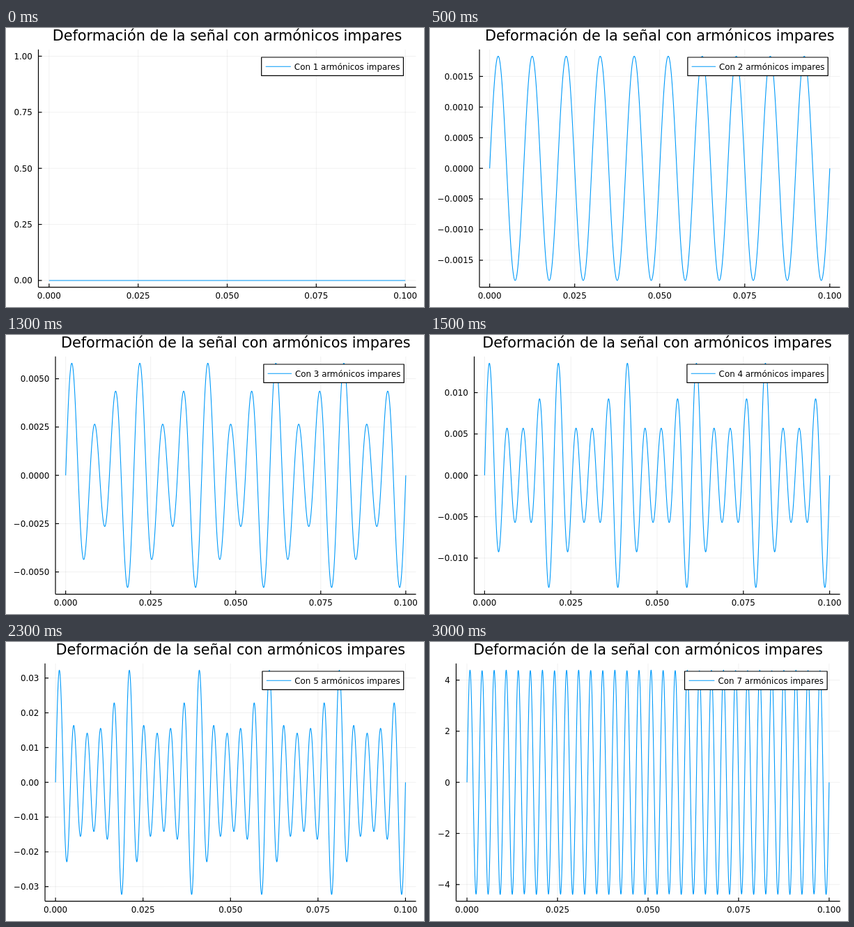
Write an HTML page with a canvas that moves like this. It is 600 by 400 pixels and loops after 3500 ms.

```html
<!DOCTYPE html>
<html lang="es">
<head>
<meta charset="utf-8">
<style>
html, body { margin: 0; width: 100%; height: 100%; overflow: hidden; background: #fff; }
canvas { display: block; }
</style>
</head>
<body>
<canvas id="plot" width="600" height="400"></canvas>
<script>
const ctx = document.getElementById('plot').getContext('2d');
const TOP = 30.8, BOTTOM = 371.6, RIGHT = 588.5, PAD = 0.03 / 1.06;
const HOLD = 500, DURATION = 0.1, SAMPLES = 2000, BLUE = '#009af9';

// Amplitude of each multiple of 50 Hz; the sixth one resonates.
const amplitudes = [0, 0.00183, 0.00418, 0.00824, 0.01964, 4.382, -0.023];

// Left axis position, tick step, highest tick (in steps) and decimals.
const views = [
  { left: 46.5, step: 0.25, count: 4, digits: 2 },
  { left: 71, step: 0.0005, count: 3, digits: 4 },
  { left: 71, step: 0.0025, count: 2, digits: 4 },
  { left: 63.5, step: 0.005, count: 2, digits: 3 },
  { left: 56, step: 0.01, count: 3, digits: 2 },
  { left: 37.5, step: 2, count: 2, digits: 0 },
  { left: 37.5, step: 2, count: 2, digits: 0 }
];

function signal(t, harmonics) {
  let sum = 0;
  for (let k = 0; k < harmonics; k++) {
    sum += amplitudes[k] * Math.sin(2 * Math.PI * 50 * (k + 1) * t);
  }
  return sum;
}

function line(x1, y1, x2, y2, color, width) {
  ctx.strokeStyle = color;
  ctx.lineWidth = width;
  ctx.beginPath();
  ctx.moveTo(x1, y1);
  ctx.lineTo(x2, y2);
  ctx.stroke();
}

function label(text, x, baseline, align, size = 11.9) {
  ctx.font = `${size}px "DejaVu Sans", sans-serif`;
  ctx.textAlign = align;
  ctx.fillStyle = '#000';
  ctx.fillText(text, x, baseline);
}

function drawLegend(harmonics, width) {
  const text = `Con ${harmonics} armónicos impares`;
  const right = RIGHT - width / 30, gap = width / 108;
  ctx.font = '11.9px "DejaVu Sans", sans-serif';
  const textX = right - gap - ctx.measureText(text).width;
  const lineEnd = textX - gap, lineStart = lineEnd - width / 15;
  const left = lineStart - width / 90;
  ctx.fillStyle = '#fff';
  ctx.fillRect(left, 42, right - left, 26.3);
  ctx.strokeStyle = '#000';
  ctx.lineWidth = 1.2;
  ctx.strokeRect(left, 42, right - left, 26.3);
  line(lineStart, 55.2, lineEnd, 55.2, BLUE, 1.1);
  label(text, textX, 59.6, 'left');
}

function draw(index) {
  const { left, step, count, digits } = views[index];
  const harmonics = index + 1, width = RIGHT - left, height = BOTTOM - TOP;
  const values = Array.from({ length: SAMPLES + 1 },
    (_, i) => signal(DURATION * i / SAMPLES, harmonics));
  const flat = index === 0;
  const max = flat ? 1 : Math.max(...values), min = flat ? 0 : -max;
  const toX = t => left + width * (PAD + t / DURATION / 1.06);
  const toY = v => BOTTOM - height * (PAD + (v - min) / (max - min) / 1.06);
  const xTicks = [0, 0.025, 0.05, 0.075, 0.1];
  const yTicks = [];
  for (let k = flat ? 0 : -count; k <= count; k++) yTicks.push(k * step);

  ctx.fillStyle = '#fff';
  ctx.fillRect(0, 0, 600, 400);
  const grid = 'rgba(0,0,0,0.1)';
  for (const t of xTicks) line(toX(t), TOP, toX(t), BOTTOM, grid, 0.6);
  for (const v of yTicks) line(left, toY(v), RIGHT, toY(v), grid, 0.6);

  line(left, BOTTOM, RIGHT, BOTTOM, '#000', 1.2);
  line(left, TOP, left, BOTTOM, '#000', 1.2);
  for (const t of xTicks) {
    line(toX(t), BOTTOM, toX(t), BOTTOM - 5, '#000', 1.2);
    label(t.toFixed(3), toX(t), 387.6, 'center');
  }
  for (const v of yTicks) {
    line(left, toY(v), left + 5, toY(v), '#000', 1.2);
    label(v.toFixed(digits).replace('-', '−'), left - 8.6, toY(v) + 4.3, 'right');
  }
  label('Deformación de la señal con armónicos impares',
    (left + RIGHT) / 2, 18, 'center', 20.8);

  ctx.strokeStyle = BLUE;
  ctx.lineWidth = 1.1;
  ctx.lineJoin = 'round';
  ctx.beginPath();
  values.forEach((v, i) => ctx.lineTo(toX(DURATION * i / SAMPLES), toY(v)));
  ctx.stroke();
  drawLegend(harmonics, width);
}

let shown = -1;
function tick() {
  const index = Math.floor(performance.now() / HOLD) % views.length;
  if (index !== shown) draw(shown = index);
  requestAnimationFrame(tick);
}
tick();
</script>
</body>
</html>
```
